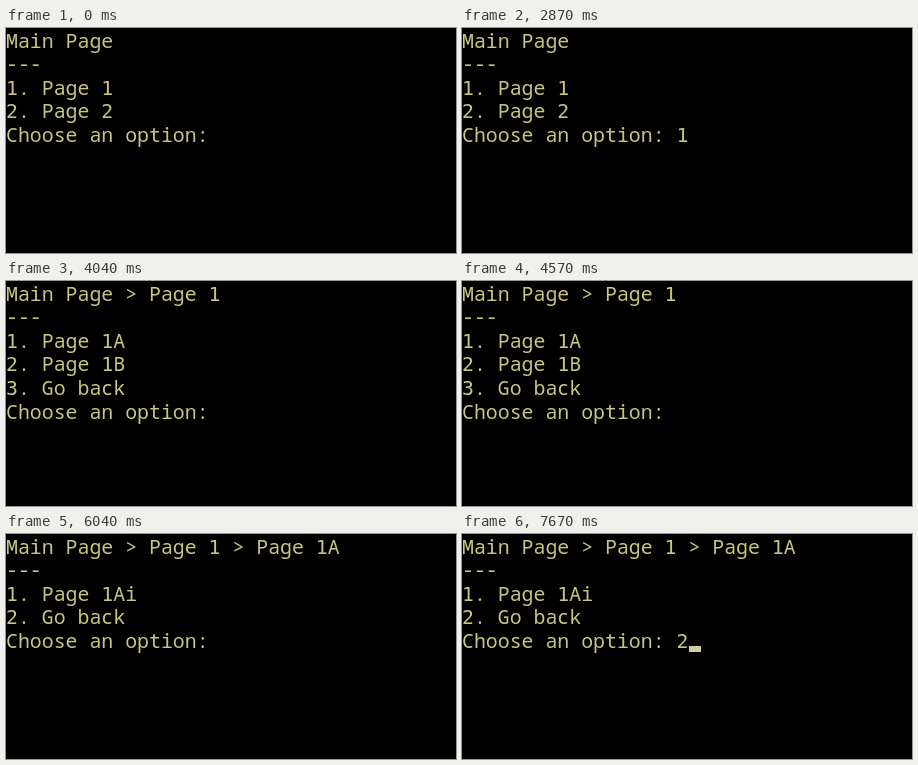
Animation of 450 by 225 pixels, one loop 8 s. Source, as an HTML page:

```html
<!DOCTYPE html>
<html lang="en">
<head>
<meta charset="utf-8">
<title>Console menu</title>
<style>
  html, body { margin: 0; width: 100%; height: 100%; overflow: hidden; background: #000; }
  svg { display: block; width: 100vw; height: 100vh; }
  text { font: 19.88px "Noto Sans Mono", "DejaVu Sans Mono", monospace; fill: #c6c67e; white-space: pre; }
  .digit { font: 19.82px "DejaVu Sans Mono", monospace; }
  #cursor { fill: #cfcfa2; }
</style>
</head>
<body>
<svg viewBox="0 0 450 225">
  <g id="screen"></g>
  <rect id="cursor" width="12" height="6"/>
</svg>
<script>
const LOOP = 8000, CELL = 11.93, PITCH = 23.63, BASE = 19.5;
const NS = "http://www.w3.org/2000/svg";
const prompt = "Choose an option: ";

const pages = [
  ["Main Page", "---", "1. Page 1", "2. Page 2"],
  ["Main Page > Page 1", "---", "1. Page 1A", "2. Page 1B", "3. Go back"],
  ["Main Page > Page 1 > Page 1A", "---", "1. Page 1Ai", "2. Go back"]
];

// [start ms, page, typed answer]
const steps = [
  [0, 0, ""], [2300, 0, "1"],
  [4040, 1, ""], [5440, 1, "1"],
  [6040, 2, ""], [7470, 2, "2"]
];

// times at which the cursor turns on and off
const blinks = [
  [70, 730], [1270, 1800], [2340, 2870], [3400, 3940], [4070, 4170],
  [5010, 5440], [5540, 6040], [6610, 7140], [7640, LOOP]
];

const screen = document.getElementById("screen");
const cursor = document.getElementById("cursor");

function addLine(str, row) {
  const line = document.createElementNS(NS, "text");
  line.setAttribute("y", BASE + row * PITCH);
  for (const part of str.split(/(\d)/)) {
    const span = document.createElementNS(NS, "tspan");
    span.textContent = part;
    if (/\d/.test(part)) span.setAttribute("class", "digit");
    line.append(span);
  }
  screen.append(line);
}

function show([, page, answer]) {
  const lines = [...pages[page], prompt + answer];
  screen.replaceChildren();
  lines.forEach(addLine);
  cursor.setAttribute("x", Math.round((prompt.length + answer.length) * CELL));
  cursor.setAttribute("y", Math.round(BASE + (lines.length - 1) * PITCH - 2));
}

let current;
function draw(now) {
  const t = now % LOOP;
  const step = steps.findLast(s => s[0] <= t);
  if (step !== current) show(current = step);
  const lit = blinks.some(([on, off]) => t >= on && t < off);
  cursor.setAttribute("visibility", lit ? "visible" : "hidden");
}

const start = performance.now();
function tick() {
  draw(performance.now() - start);
  requestAnimationFrame(tick);
}
tick();
</script>
</body>
</html>
```
